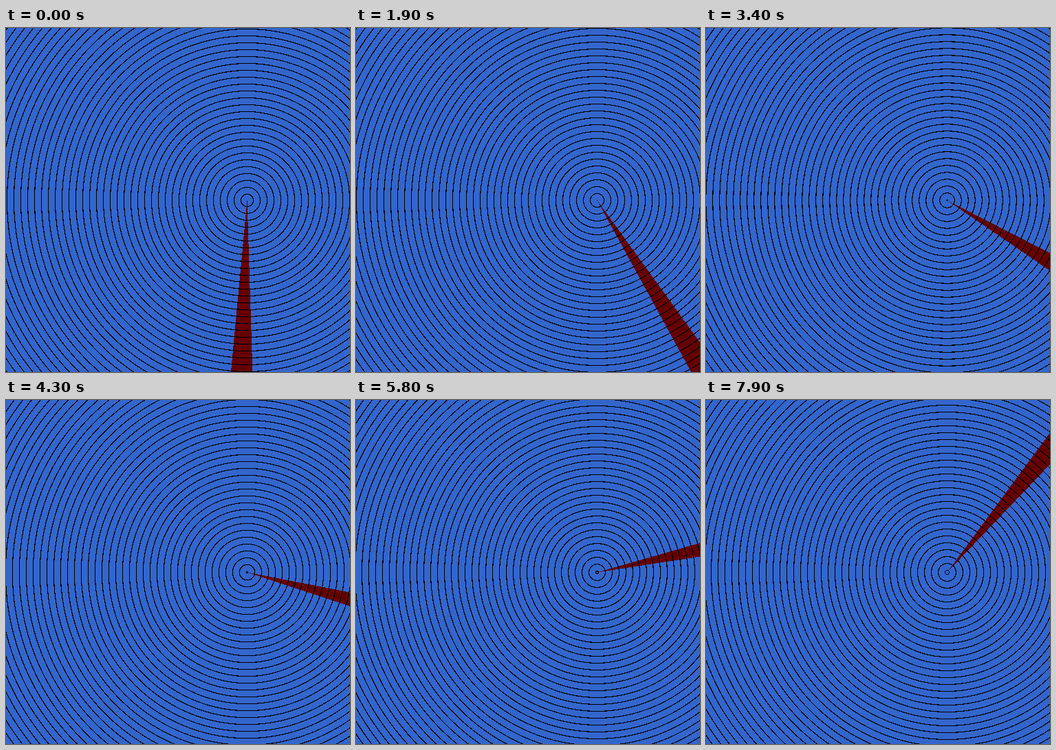
An HTML page with a canvas that plays this animation: 500 by 500 pixels, repeating every 8000 ms.

```html
<!DOCTYPE html>
<html>
<head>
<meta charset="utf-8">
<style>
  html, body { margin: 0; width: 100%; height: 100%; overflow: hidden; background: #36c; }
  canvas { display: block; }
</style>
</head>
<body>
<canvas id="stage" width="500" height="500"></canvas>
<script>
const SIZE = 500, CX = 350, CY = 250;
const STEP_MS = 100, STEPS = 80;
const GAP = 10, LINE = 1.2;            // ring spacing and thickness, px
const START = 88.2, SWEEP = 7.2, TURN = 1.795; // wedge angles, degrees

const ctx = document.getElementById('stage').getContext('2d');
const image = ctx.createImageData(SIZE, SIZE);
const pixels = new Uint32Array(image.data.buffer);
const BLACK = 0xff000000, BLUE = 0xffcc6633, RED = 0xff000066; // ABGR

const radius = new Float32Array(SIZE * SIZE);
const angle = new Float32Array(SIZE * SIZE);
for (let i = 0; i < radius.length; i++) {
  const x = i % SIZE - CX, y = Math.floor(i / SIZE) - CY;
  radius[i] = Math.hypot(x, y);
  angle[i] = Math.atan2(y, x) * 180 / Math.PI;
}

function draw(step) {
  const ring = 9 + step * 0.05;
  const edge = START - step * TURN;
  for (let i = 0; i < pixels.length; i++) {
    const onRing = (radius[i] - ring + LINE / 2 + 2 * GAP) % GAP < LINE;
    const inWedge = (angle[i] - edge + 720) % 360 < SWEEP;
    pixels[i] = onRing ? BLACK : inWedge ? RED : BLUE;
  }
  ctx.putImageData(image, 0, 0);
}

const start = performance.now();
let shown = -1;
function tick() {
  const step = Math.floor((performance.now() - start) / STEP_MS) % STEPS;
  if (step !== shown) draw(shown = step);
  requestAnimationFrame(tick);
}
tick();
</script>
</body>
</html>
```
